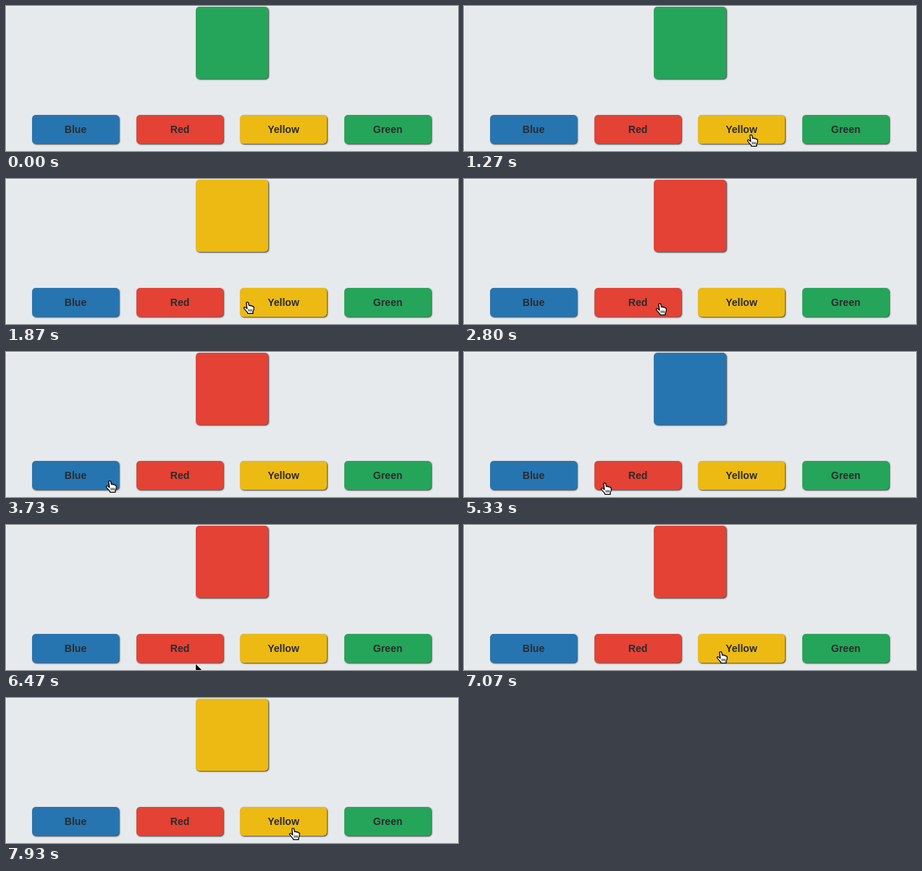
Recreate the animation shown at these times as an HTML page. Size 624 px wide and 201 px high, loop 8 s.

```html
<!DOCTYPE html>
<html lang="en">
<head>
<meta charset="utf-8">
<title>Colour picker</title>
<style>
  html, body { margin: 0; width: 100%; height: 100%; overflow: hidden; }
  #stage {
    position: relative; width: 624px; height: 201px; overflow: hidden;
    background: #e7eaed; box-shadow: inset 1px 1px #f6f7f8, inset -1px 0 #f3f5f6;
  }
  #swatch, .button {
    position: absolute; border-radius: 5px;
    box-shadow: 1px 1px 2px rgba(0, 0, 0, .75);
  }
  #swatch { left: 262px; top: 1px; width: 100px; height: 100px; }
  .button {
    top: 151px; width: 120px; height: 40px;
    font: bold 14px/40px "Liberation Sans", Arial, sans-serif;
    text-align: center; color: #2b2b2d;
  }
  svg { position: absolute; left: 0; top: 0; }
</style>
</head>
<body>
<div id="stage">
  <div id="swatch"></div>
  <svg width="624" height="201">
    <g id="cursor">
      <g id="hand" transform="translate(.5 -.3) scale(1 .95)" fill="#fff" stroke="#000" stroke-width="1.3" stroke-linejoin="round">
        <path d="M-1.7 1.2C-1.7-.5 1-.5 1.3 1.2L2 5.2C3 4.2 4.4 4.6 4.6 5.6C5.6 4.8 6.8 5.4 7 6.4
                 C8 6 8.8 6.8 8.8 7.8C9 10 8.6 12 7.4 14V16.5H.2L-.2 15C-2 13-3.5 11-5 9
                 C-5.6 7.4-4 6.6-2.8 7.8L-.7 9.6Z"/>
        <path d="M1.6 10.3V13.6M3.7 10.3V13.6M5.7 10.3V13.6" stroke-width="1"/>
      </g>
      <path id="arrow" d="M0 0V13L3 10.2 5 15 7.4 14 5.3 9.3H9.4Z" stroke="#fff" stroke-width=".8" paint-order="stroke"/>
    </g>
  </svg>
</div>
<script>
const LOOP = 8000, WIDTH = 120;
const colors = { Blue: '#2675b0', Red: '#e34235', Yellow: '#ecba12', Green: '#25a559' };
const names = Object.keys(colors);
const leftOf = i => Math.round(36 + 143.6 * i);

const clicks = { 0: 'Green', 1530: 'Yellow', 2800: 'Red', 4330: 'Blue', 5730: 'Red', 7530: 'Yellow' };

// Pointer moves: power < 1 slows down, > 1 speeds up; bow bends the path downwards.
const entry = { x: 397, y: 201 };
const moves = [
  { from: 200, to: 330, x: 397, y: 176 },
  { from: 1200, to: 1330, x: 396, y: 181 },
  { from: 1600, to: 2330, x: 270, y: 173, power: 0.7, bow: -6 },
  { from: 2870, to: 3750, x: 137, y: 179, power: 2 },
  { from: 4870, to: 5330, x: 194, y: 182 },
  { from: 6270, to: 7070, x: 354, y: 176, power: 0.62, bow: 14 },
  { from: 7730, to: 7930, x: 396, y: 181 }
];

const $ = id => document.getElementById(id);
const stage = $('stage'), swatch = $('swatch'), cursor = $('cursor');

names.forEach((name, i) => {
  const button = document.createElement('div');
  button.className = 'button';
  button.textContent = name;
  button.style.left = leftOf(i) + 'px';
  button.style.background = colors[name];
  stage.insertBefore(button, swatch);
});

function pointAt(t) {
  let { x, y } = entry;
  for (const { from, to, power = 1, bow = 0, ...end } of moves) {
    if (t < from) break;
    const k = Math.min(1, (t - from) / (to - from)) ** power;
    x += (end.x - x) * k;
    y += (end.y - y) * k + bow * Math.sin(Math.PI * k);
  }
  return [Math.round(x), Math.round(y)];
}

const overButton = (x, y) => y >= 151 && y < 191 &&
  names.some((_, i) => x >= leftOf(i) && x < leftOf(i) + WIDTH);

function draw(t) {
  const picked = Object.keys(clicks).filter(time => time <= t).pop();
  swatch.style.background = colors[clicks[picked]];
  const point = pointAt(t), over = overButton(...point);
  $('hand').style.display = over ? '' : 'none';
  $('arrow').style.display = over ? 'none' : '';
  cursor.setAttribute('transform', `translate(${point})`);
}

// The picture advances at 15 steps a second, on times rounded to 10 ms.
const start = performance.now();
function tick() {
  const t = (performance.now() - start) % LOOP;
  const step = Math.floor(t * 3 / 200 + 0.05);
  draw(Math.round(step * 20 / 3) * 10 % LOOP);
  requestAnimationFrame(tick);
}
tick();
</script>
</body>
</html>
```
